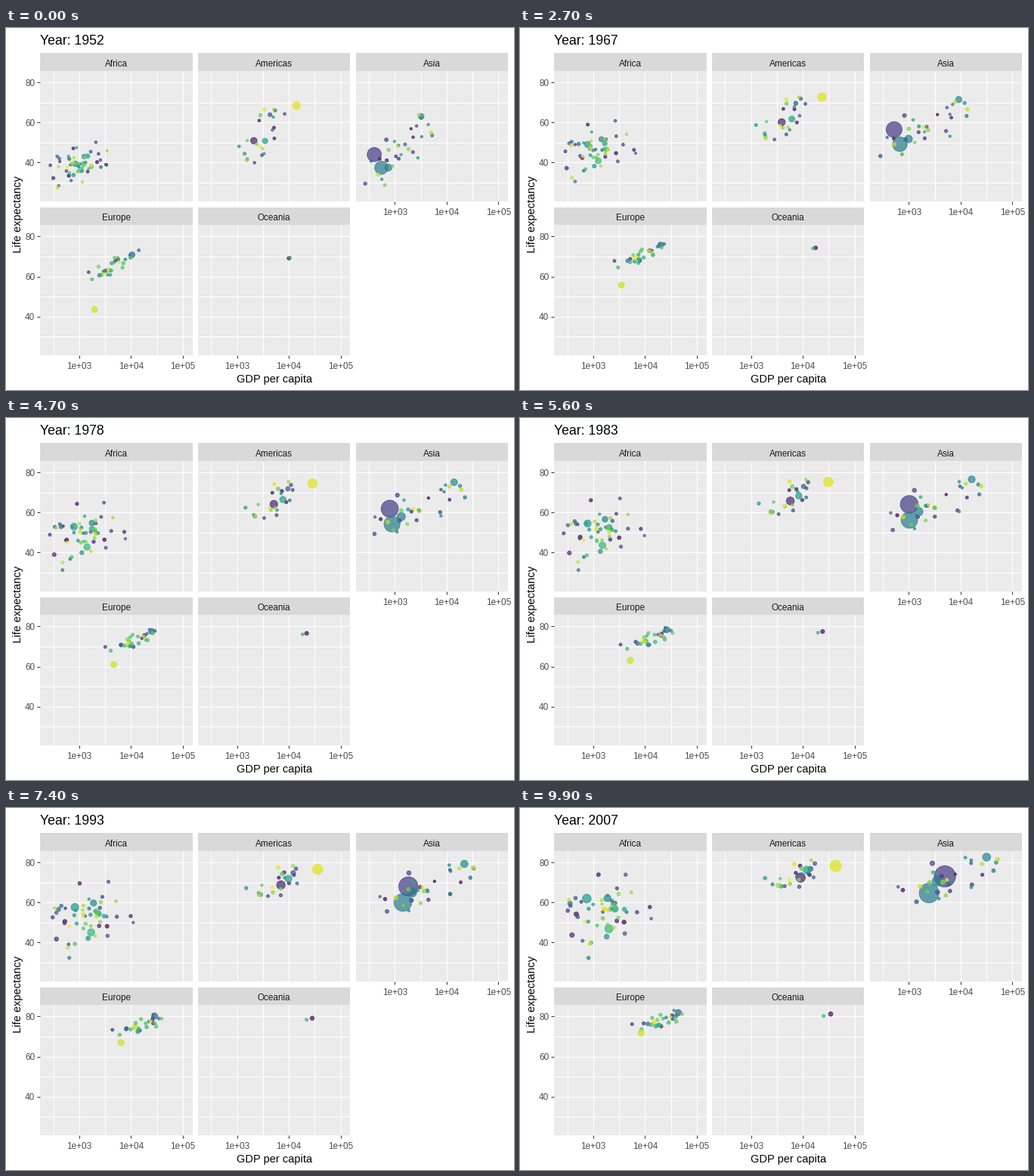
These frames come from a looping animation (672 by 480 pixels, 10 s). A matplotlib script:

```python
import matplotlib.pyplot as plt
import numpy as np
from matplotlib.animation import FuncAnimation
from matplotlib.patches import Rectangle

W, H, DPI, FRAMES = 672, 480, 96, 100
PX = 72 / DPI
PANEL_W, PANEL_H, STRIP_H = 201.6, 172.8, 23.7
XSCALE, YSCALE = 68.52, 2.66
COLOURS = 142
KNOTS = np.linspace(0, 1, 12)
rng = np.random.default_rng(11)

# name: column, row, population growth
REGIONS = {
    "Africa": (0, 0, 3.6),
    "Americas": (1, 0, 2.6),
    "Asia": (2, 0, 2.5),
    "Europe": (0, 1, 1.3),
    "Oceania": (1, 1, 2.2),
}

# Small bubbles: count, correlation, then start and end as
# (mean, sd) of log income and (mean, sd) of life expectancy
CROWDS = {
    "Africa": (51, .4, (2.99, .28, 39.2, 5), (3.2, .4, 55.5, 9)),
    "Americas": (22, .6, (3.49, .23, 53.5, 8.5), (3.85, .28, 73.3, 3.5)),
    "Asia": (29, .65, (3.11, .36, 46.5, 8.5), (3.8, .48, 71.5, 5.5)),
    "Europe": (29, .88, (3.66, .24, 65.5, 4), (4.32, .24, 78, 2.6)),
}

# The largest bubbles: colour rank, final population (millions),
# then income and life expectancy at the start and at the end
LEADERS = [
    ("Africa", 94, 135, (1077, 36.3), (2014, 46.9)),
    ("Americas", 134, 301, (13990, 68.4), (42952, 78.2)),
    ("Americas", 14, 190, (2109, 50.9), (9066, 72.4)),
    ("Americas", 82, 109, (3478, 50.8), (11978, 76.2)),
    ("Asia", 24, 1319, (400, 44), (4959, 73)),
    ("Asia", 58, 1110, (547, 37.4), (2452, 64.7)),
    ("Asia", 59, 224, (750, 37.5), (3541, 70.7)),
    ("Asia", 66, 127, (3217, 63), (31656, 82.6)),
    ("Europe", 131, 71, (1969, 43.6), (8458, 71.8)),
    ("Oceania", 5, 20, (10040, 69.1), (34435, 81.2)),
    ("Oceania", 91, 4, (10557, 69.4), (25185, 80.2)),
]


def panel_origin(col, row):
    return 45 + col * 208.8, 57.15 + row * 204.3


def to_x(left, log_income):
    return left + (log_income - 2.2436) * XSCALE


def to_y(top, life):
    return top + (85.6 - life) * YSCALE


def income_path(start, end):
    """Poorer economies take off later."""
    bend = np.clip(1.75 - 1.5 * (start - 2.6), .6, 1.8)
    return start + (end - start) * KNOTS ** bend


def life_path(start, end):
    """Gains come early and then level off."""
    return start + (end - start) * KNOTS ** .65


def normals(n):
    z = rng.standard_normal(n)
    return np.clip((z - z.mean()) / z.std(), -2, 2)


def blend(z, rho):
    return rho * z + np.sqrt(1 - rho ** 2) * normals(len(z))


def crowd(n, rho, start, end):
    zx = normals(n)
    zy = blend(zx, rho)
    zx_end, zy_end = blend(zx, .9), blend(zy, .85)
    pops = np.exp(rng.normal(2, .85, n))
    for i in range(n):
        log_income = income_path(start[0] + start[1] * zx[i], end[0] + end[1] * zx_end[i])
        life = life_path(start[2] + start[3] * zy[i], end[2] + end[3] * zy_end[i])
        yield (log_income + rng.normal(0, .02, len(KNOTS)),
               life + rng.normal(0, .35, len(KNOTS)), pops[i])


def build():
    used = {leader[1] for leader in LEADERS}
    spare = iter(rng.permutation([i for i in range(COLOURS) if i not in used]))
    dots = []

    def add(region, rank, log_income, life, pop):
        col, row, growth = REGIONS[region]
        left, top = panel_origin(col, row)
        dots.append((rank, to_x(left, log_income), to_y(top, life),
                     pop * growth ** (KNOTS - 1)))

    for region, rank, pop, (g0, l0), (g1, l1) in LEADERS:
        add(region, rank, income_path(np.log10(g0), np.log10(g1)), life_path(l0, l1), pop)
    for region, spec in CROWDS.items():
        for log_income, life, pop in crowd(*spec):
            add(region, next(spare), log_income, life, pop)
    dots.sort(key=lambda d: d[0])
    return [np.array(part) for part in zip(*dots)]


def marker_area(pop):
    size = 1 + 9 * np.sqrt(pop / 1319)
    radius = size * 1.42 - .1
    return (2 * radius * PX) ** 2


fig = plt.figure(figsize=(W / DPI, H / DPI), dpi=DPI, facecolor="white")
ax = fig.add_axes([0, 0, 1, 1])
ax.set(xlim=(0, W), ylim=(H, 0))
ax.axis("off")


def label(x, y, text, size, colour="black", ha="center", **kw):
    return ax.text(x, y, text, fontsize=size * PX, color=colour, ha=ha,
                   va="baseline", family="Liberation Sans", **kw)


def line(xs, ys, colour):
    ax.plot(xs, ys, color=colour, lw=PX, solid_capstyle="butt", zorder=2)


def box(x, y, w, h, colour):
    ax.add_patch(Rectangle((x, y), w, h, fc=colour, lw=0, zorder=1))


def draw_panel(name, col, row):
    left, top = panel_origin(col, row)
    right, bottom = left + PANEL_W, top + PANEL_H
    box(left, top - STRIP_H, PANEL_W, STRIP_H, "#D9D9D9")
    box(left, top, PANEL_W, PANEL_H, "#EBEBEB")
    label((left + right) / 2, top - 6.2, name, 11.73, "#1A1A1A")
    for power in np.arange(2.5, 5.1, .5):
        x = to_x(left, power)
        line([x, x], [top, bottom], "white")
        if power >= 3 and power % 1 == 0 and (row == 1 or col == 2):
            line([x, x], [bottom, bottom + 3.7], "#333333")
            label(x, bottom + 18.2, f"1e+0{int(power)}", 11.73, "#4D4D4D")
    for life in range(30, 81, 10):
        y = to_y(top, life)
        line([left, right], [y, y], "white")
        if col == 0 and life % 20 == 0:
            line([left - 3.7, left], [y, y], "#333333")
            label(left - 6.6, y + 4.6, str(life), 11.73, "#4D4D4D", ha="right")


for name, (col, row, _) in REGIONS.items():
    draw_panel(name, col, row)
title = label(45, 22, "", 17.6, ha="left")
label(355, 470, "GDP per capita", 14.67)
label(19.6, 246.5, "Life expectancy", 14.67, rotation=90, rotation_mode="anchor")

ranks, xs, ys, pops = build()
colours = plt.get_cmap("viridis")(ranks / (COLOURS - 1))
colours[:, 3] = .7
bubbles = ax.scatter(xs[:, 0], ys[:, 0], s=marker_area(pops[:, 0]),
                     facecolors=colours, edgecolors=colours,
                     linewidths=.94 * PX, zorder=3)


def at(paths, pos):
    i = min(int(pos), len(KNOTS) - 2)
    return paths[:, i] + (paths[:, i + 1] - paths[:, i]) * (pos - i)


def update(frame):
    t = frame / (FRAMES - 1)
    pos = t * (len(KNOTS) - 1)
    bubbles.set_offsets(np.column_stack([at(xs, pos), at(ys, pos)]))
    bubbles.set_sizes(marker_area(at(pops, pos)))
    title.set_text(f"Year: {round(1952 + 55 * t)}")
    return bubbles, title


anim = FuncAnimation(fig, update, frames=FRAMES, interval=100,
                     repeat=True, repeat_delay=0, blit=False)
plt.show()
```
